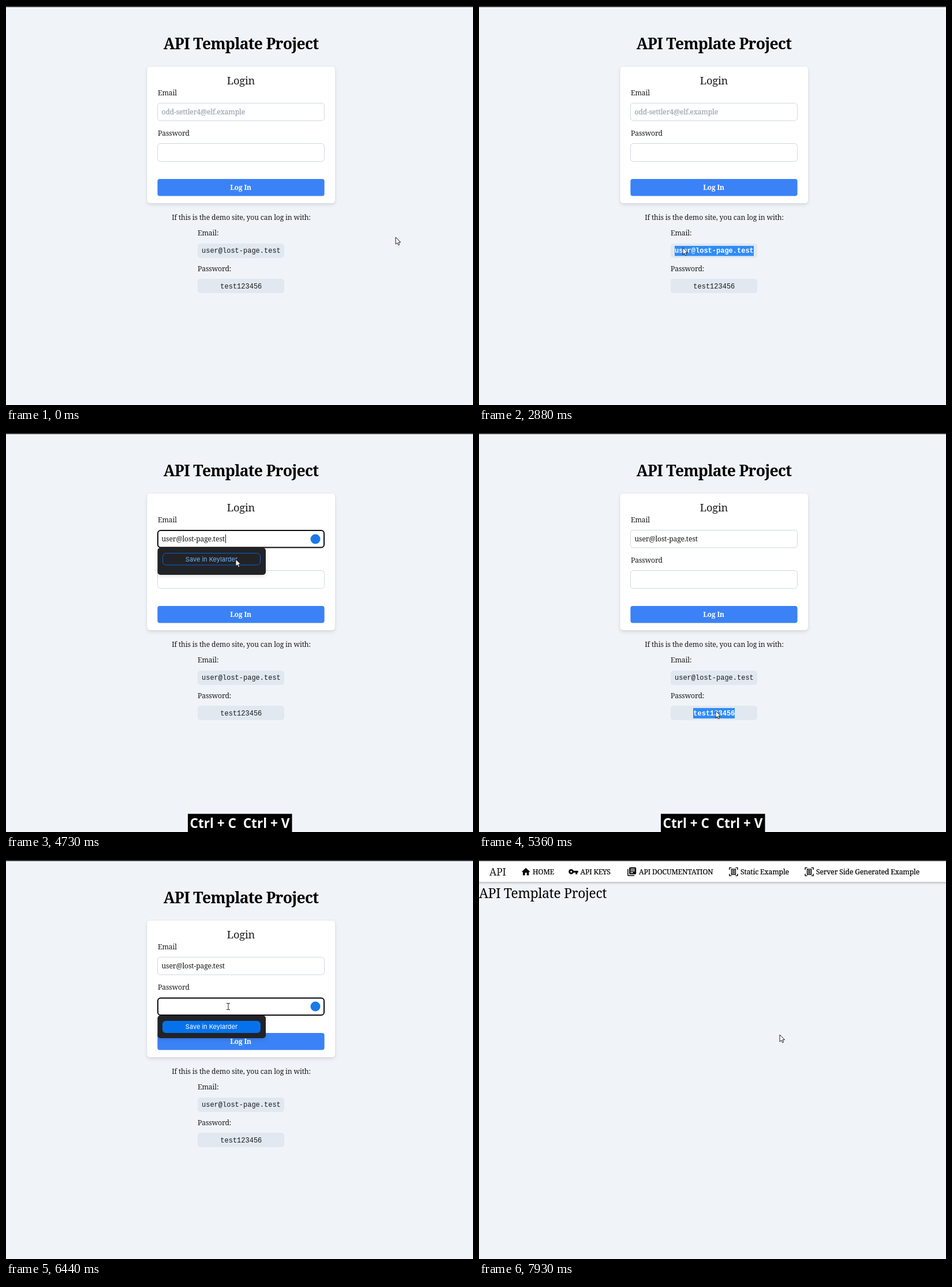
Animation, 809 px wide and 692 px high, one loop 8 s. Source, as an HTML page:

```html
<!DOCTYPE html>
<html lang="en">
<head>
<meta charset="utf-8">
<title>Login walkthrough</title>
<style>
  html, body { margin: 0; width: 100%; height: 100%; overflow: hidden; background: #f0f4f9; }
  svg { display: block; width: 809px; height: 692px; }
  text { font: 400 12.2px "Noto Serif", serif; letter-spacing: -.012em; fill: #1a1a1a; white-space: pre; }
  .mid { text-anchor: middle; }
  .title { font-size: 26.5px; font-weight: 600; letter-spacing: -.028em; fill: #000; }
  .login { font-size: 18.3px; }
  .hint { fill: #9ca3af; stroke: #9ca3af; stroke-width: .2; }
  .send { font-size: 11.9px; font-weight: 600; fill: #fff; }
  .mono { font: 400 12px "Liberation Mono", monospace; letter-spacing: 0; }
  .picked { font-weight: 700; fill: #fff; }
  .save { font: 400 11px Inter, sans-serif; letter-spacing: 0; text-anchor: middle; }
  .keys { font: 700 22.6px "Open Sans", sans-serif; letter-spacing: 0; fill: #fff; }
  .brand { font-size: 17.5px; }
  .link { font-size: 12.2px; font-weight: 500; fill: #000; stroke: #000; stroke-width: .2; }
  .head { font-size: 22.8px; fill: #000; }
  .card { fill: #fff; filter: drop-shadow(0 3px 3px rgba(0,0,0,.1)) drop-shadow(0 0 1px rgba(0,0,0,.08)); }
  .field { fill: #fff; stroke: #cfd6e2; }
  .focus { fill: none; stroke: #0c0d10; stroke-width: 2; }
  .chip { fill: #e1e8f0; }
  .sel { fill: #2f8cf8; }
  .pop { fill: #222326; filter: drop-shadow(0 2px 3px rgba(0,0,0,.12)); }
  .badge { fill: #1a7be8; }
  .bar { fill: #fff; filter: drop-shadow(0 1px 2px rgba(0,0,0,.35)); }
</style>
</head>
<body>
<svg viewBox="0 0 809 692">
  <defs>
    <g id="scan" transform="scale(.7)" fill="none" stroke="#000" stroke-width="2">
      <path d="M2 7V2h5M17 2h5v5M22 17v5h-5M7 22H2v-5"/>
      <path d="M7 5.500h10v13H7zM9 9h6M9 12h6M9 15h6"/>
    </g>
  </defs>
  <rect width="809" height="692" fill="#f0f4f9"/>

  <g data-on="0 7460">
    <text class="title mid" x="407" y="75.200">API Template Project</text>
    <rect class="card" x="244.500" y="105" width="325.500" height="237" rx="5"/>
    <text class="login mid" x="407" y="136">Login</text>
    <text x="263" y="154.500">Email</text>
    <rect class="field" x="262.500" y="168.500" width="289" height="30.500" rx="5"/>
    <text x="263" y="225">Password</text>
    <rect class="field" x="262.500" y="238.500" width="289" height="31" rx="5"/>
    <rect x="262.400" y="300" width="289.200" height="29.600" rx="4" fill="#3b82f6"/>
    <rect data-on="6760 7460" x="262.400" y="300" width="289.200" height="29.600" rx="4" fill="#1d4ed8"/>
    <text class="send mid" x="406.500" y="319.300">Log In</text>
    <rect data-on="7150 7460" class="focus" x="261" y="299" width="292" height="32" rx="5"/>

    <text class="hint" data-on="0 4640" x="269.500" y="188.300">odd-settler4@elf.example</text>
    <text data-on="4640 8000" x="269.500" y="188.300">user@lost-page.test</text>
    <g data-on="4490 5330">
      <rect class="focus" x="263" y="169" width="288" height="29.500" rx="5"/>
      <circle class="badge" cx="536" cy="184" r="8.500"/>
    </g>
    <path data-on="4640 5330" d="M380.500 176v15" stroke="#111"/>

    <g id="dots" data-on="6500 8000" fill="#1a1a1a"></g>
    <g data-on="6350 7150">
      <rect class="focus" x="263" y="239.500" width="288" height="29.500" rx="5"/>
      <circle class="badge" cx="536" cy="254" r="8.500"/>
    </g>
    <path data-on="6500 7150" d="M309.500 246v16" stroke="#111"/>

    <g data-on="4560 5330">
      <rect class="pop" x="262.500" y="199" width="187.500" height="47" rx="5"/>
      <rect x="271.500" y="208.500" width="169" height="20.500" rx="6" fill="none" stroke="#0b62d0"/>
      <text class="save" x="356" y="222.700" style="fill:#74b5ff">Save in Keylarder</text>
    </g>
    <g data-on="6400 7150">
      <rect class="pop" x="262.500" y="269.500" width="187.500" height="39.500" rx="5"/>
      <rect x="271" y="279" width="170" height="21" rx="6" fill="#0572ec"/>
      <text class="save" x="356" y="293.300" style="fill:#fff">Save in Keylarder</text>
    </g>

    <text class="mid" x="407.500" y="371">If this is the demo site, you can log in with:</text>
    <text x="332" y="398">Email:</text>
    <rect class="chip" x="332" y="412" width="150" height="25" rx="5"/>
    <text class="mono" x="339" y="428">user@lost-page.test</text>
    <g data-on="2690 2880">
      <rect class="sel" x="339" y="416" width="29" height="17.500"/>
      <text class="mono picked" x="339" y="428">user</text>
    </g>
    <g data-on="2880 4490">
      <rect class="sel" x="339" y="416" width="137" height="17.500"/>
      <text class="mono picked" x="339" y="428">user@lost-page.test</text>
    </g>
    <text x="332" y="459.500">Password:</text>
    <rect class="chip" x="332" y="473" width="150" height="25" rx="5"/>
    <text class="mono" x="371.300" y="489.500">test123456</text>
    <g data-on="5330 6350">
      <rect class="sel" x="371" y="477" width="72" height="18"/>
      <text class="mono picked" x="371.300" y="489.500">test123456</text>
    </g>

    <g data-on="3720 4640">
      <rect x="361.500" y="660.500" width="87.500" height="31.500"/>
      <text class="keys mid" x="405" y="684.700">Ctrl + C</text>
    </g>
    <g data-on="4640 5560">
      <rect x="315" y="660.500" width="180.500" height="31.500"/>
      <text class="keys mid" x="405" y="684.700">Ctrl + C  Ctrl + V</text>
    </g>
    <g data-on="6500 7240">
      <rect x="361.500" y="660.500" width="87.500" height="31.500"/>
      <text class="keys mid" x="405" y="684.700">Ctrl + V</text>
    </g>
  </g>

  <g data-on="7460 8000">
    <rect class="bar" x="-6" y="0" width="821" height="38"/>
    <text class="brand" x="18" y="27">API</text>
    <path transform="translate(72.200 11.500) scale(.75)" d="M10 20v-6h4v6h5v-8h3L12 3 2 12h3v8z"/>
    <text class="link" x="93" y="24.700">HOME</text>
    <path transform="translate(154.500 11.200) scale(.75)" fill-rule="evenodd" d="M12.650 10A6 6 0 1 0 12.650 14H17v4h4v-4h2v-4zM7 14a2 2 0 1 1 0-4 2 2 0 0 1 0 4z"/>
    <text class="link" x="175.500" y="24.700">API KEYS</text>
    <path transform="translate(255.700 11.200) scale(.75)" fill-rule="evenodd" d="M4 6H2v14a2 2 0 0 0 2 2h14v-2H4zM20 2H8a2 2 0 0 0-2 2v12a2 2 0 0 0 2 2h12a2 2 0 0 0 2-2V4a2 2 0 0 0-2-2zM19 11H9V9h10zM15 15H9v-2h6zM19 7H9V5h10z"/>
    <text class="link" x="277" y="24.700">API DOCUMENTATION</text>
    <use href="#scan" transform="translate(432.500 12)"/>
    <text class="link" x="453" y="24.700">Static Example</text>
    <use href="#scan" transform="translate(563.700 12)"/>
    <text class="link" x="584" y="24.700">Server Side Generated Example</text>
    <text class="head" x="0" y="65.700">API Template Project</text>
  </g>

  <rect width="809" height="2" fill="#3b3c40"/>

  <g id="pointer">
    <path id="arrow" d="M0 0V12.200L2.800 9.600 4.700 13.700 6.700 12.800 4.900 8.800H8.600Z" fill="#fff" stroke="#1b1b1f" stroke-linejoin="round"/>
    <path id="beam" d="M-3 -5.500H-1L0 -5 1 -5.500H3M0 -5V5M-3 5.500H-1L0 5 1 5.500H3" fill="none" stroke="#222"/>
    <path id="hand" d="M-1.500 11V1.200a1.400 1.400 0 0 1 2.800 0V7a1.300 1.300 0 0 1 2.500 0 1.300 1.300 0 0 1 2.400.7 1.100 1.100 0 0 1 2 .8V12.500Q8 15 6.500 17.500H0Q-1.500 14.500-4 11.500-5 9.500-3.500 9.300-2.300 9.500-1.500 11Z" fill="#fff" stroke="#1b1b1f" stroke-linejoin="round"/>
  </g>
</svg>
<script>
const LOOP = 8000;
const byId = id => document.getElementById(id);

// time, x, y of the pointer's hot spot
const path = [
  [0, 675, 401], [360, 675, 401], [620, 470, 262], [800, 290, 176], [950, 283, 180],
  [1140, 345, 190], [1250, 345, 193], [1830, 345, 193], [1860, 344, 205], [2050, 440, 280],
  [2230, 541, 370], [2380, 470, 445], [2560, 353, 419], [2880, 353, 419], [3520, 455, 419],
  [3660, 455, 419], [3800, 488, 403], [4000, 470, 330], [4250, 410, 215], [4460, 398, 184],
  [4600, 398, 184], [4730, 398, 219], [4950, 402, 350], [5280, 410, 482], [5780, 410, 482],
  [5910, 376, 409], [6100, 372, 310], [6300, 385, 254], [6600, 385, 254], [6790, 406, 321],
  [7000, 420, 322], [7330, 519, 311], [7800, 519, 311], [7930, 521, 303], [8000, 521, 303]
];

const shapes = [
  [0, 'arrow'], [760, 'beam'], [1890, 'arrow'], [2450, 'beam'], [2690, 'arrow'],
  [4320, 'beam'], [4640, 'arrow'], [5200, 'beam'], [5360, 'arrow'], [5860, 'beam'],
  [5950, 'arrow'], [6220, 'beam'], [6660, 'arrow'], [6760, 'hand'], [7820, 'arrow']
];

byId('dots').innerHTML = Array.from({ length: 10 },
  (_, i) => `<circle cx="${271.5 + i * 4}" cy="254" r="1.4"/>`).join('');

const timed = [...document.querySelectorAll('[data-on]')].map(el => {
  const [from, to] = el.dataset.on.split(' ').map(Number);
  return { el, from, to };
});

// Slope at a point; zero next to a rest so that holds stay still
function slope(i, k) {
  const a = path[i - 1], b = path[i], c = path[i + 1];
  if (!a || !c || a[k] === b[k] || b[k] === c[k]) return 0;
  return (c[k] - a[k]) / (c[0] - a[0]);
}

function along(t, k) {
  let i = 0;
  while (i < path.length - 2 && path[i + 1][0] <= t) i++;
  const p = path[i], q = path[i + 1], d = q[0] - p[0];
  const u = (t - p[0]) / d, v = 1 - u;
  return p[k] * v * v * (1 + 2 * u) + q[k] * u * u * (3 - 2 * u)
    + d * u * v * (v * slope(i, k) - u * slope(i + 1, k));
}

function render(t) {
  for (const { el, from, to } of timed)
    el.style.display = t >= from && t < to ? '' : 'none';
  const shape = shapes.filter(s => s[0] <= t).pop()[1];
  for (const id of ['arrow', 'beam', 'hand'])
    byId(id).style.display = id === shape ? '' : 'none';
  byId('pointer').setAttribute('transform',
    `translate(${Math.round(along(t, 1))} ${Math.round(along(t, 2))})`);
}

const start = performance.now();
function tick() {
  render((performance.now() - start) % LOOP);
  requestAnimationFrame(tick);
}
tick();
</script>
</body>
</html>
```
